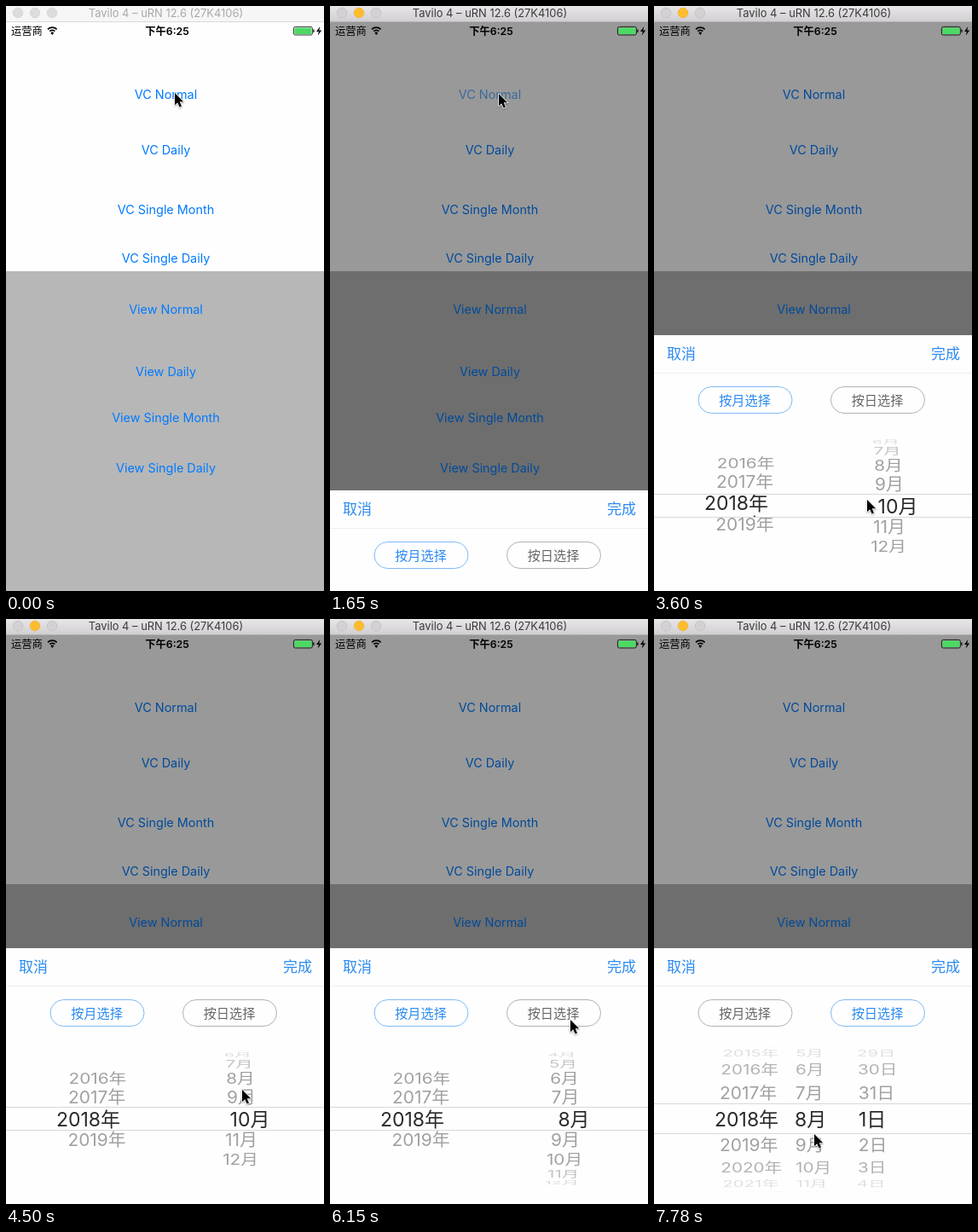
Write an HTML page with a canvas that moves like this. It is 373 px wide and 686 px high and loops after 8 s.

```html
<!DOCTYPE html>
<html lang="zh">
<head>
<meta charset="utf-8">
<title>Date picker</title>
<style>
  html, body { margin: 0; width: 373px; height: 686px; overflow: hidden; background: #fff; }
  canvas { display: block; width: 373px; height: 686px; }
</style>
</head>
<body>
<canvas id="stage"></canvas>
<script>
const W = 373, H = 686, LOOP = 8000, TICK = 150;
const MID = W / 2, SHEET = 386, AXIS = 586;
const OPEN_AT = 1500, DAILY_AT = 6450;
const BLUE = '#2a8af0';
const FONT = 'Inter, "Noto Sans CJK SC", "Noto Sans CJK", sans-serif';
const canvas = document.getElementById('stage');
const ctx = canvas.getContext('2d');
const dpr = window.devicePixelRatio || 1;
canvas.width = W * dpr;
canvas.height = H * dpr;

const links = {
  'VC Normal': 104, 'VC Daily': 169, 'VC Single Month': 239, 'VC Single Daily': 296,
  'View Normal': 356, 'View Daily': 429, 'View Single Month': 483, 'View Single Daily': 542
};

// Pointer glides; each starts where the one before ended
const glides = [
  { from: 1950, to: 2400, x: 161, y: 510 },
  { from: 2400, to: 3300, x: 118, y: 592 },
  { from: 3450, to: 3600, x: 250, y: 579 },
  { from: 3600, to: 4500, x: 277, y: 552 },
  { from: 4500, to: 5250, x: 276, y: 596 },
  { from: 5700, to: 6150, x: 282, y: 470 },
  { from: 6890, to: 7780, x: 188, y: 604 }
];

const ramp = (t, from, to) => Math.max(0, Math.min(1, (t - from) / (to - from)));
const ease = (t, from, to) => {
  const p = ramp(t, from, to);
  return p * p * (3 - 2 * p);
};

function hold(t) {
  if (t >= 7780) return 7780;
  const base = t >= 6890 ? 6890 : 0;
  return base + Math.floor((t - base) / TICK) * TICK;
}

function pointerAt(t) {
  let x = 198, y = t < 1200 ? 102 : 103;
  for (const g of glides) {
    const p = ease(t, g.from, g.to);
    x += (g.x - x) * p;
    y += (g.y - y) * p;
  }
  return [x, y];
}

// Each drag leaves a remainder that settles after release
const yearAt = t => 2019 - 0.87 * ramp(t, 2550, 3300) - 0.13 * ease(t, 3600, 3900);
const monthAt = t => 10 - 1.5 * ramp(t, 4500, 5250) - 0.5 * ease(t, 5700, 6150);

function text(str, x, y, size, color, align = 'center', weight = 400) {
  ctx.font = `${weight} ${size}px ${FONT}`;
  ctx.fillStyle = color;
  ctx.textAlign = align;
  ctx.fillText(str, x, y + size * 0.37);
}

function rect(x, y, w, h, color) {
  ctx.fillStyle = color;
  ctx.fillRect(x, y, w, h);
}

function round(x, y, w, h, r) {
  ctx.beginPath();
  ctx.roundRect(x, y, w, h, r);
}

function poly(points) {
  ctx.beginPath();
  points.forEach(([x, y]) => ctx.lineTo(x, y));
  ctx.closePath();
}

function clipped(top, bottom, draw) {
  ctx.save();
  ctx.beginPath();
  ctx.rect(0, top, W, bottom - top);
  ctx.clip();
  draw();
  ctx.restore();
}

function titleBar(active) {
  const g = ctx.createLinearGradient(0, 0, 0, 18);
  g.addColorStop(0, active ? '#e8e6e8' : '#f6f6f6');
  g.addColorStop(1, active ? '#d1cfd1' : '#f6f6f6');
  rect(0, 0, W, 18, g);
  rect(0, 18, W, 1, active ? '#b4b2b4' : '#dadada');
  ctx.lineWidth = 0.7;
  for (let i = 0; i < 3; i++) {
    const lit = active && i === 1;
    ctx.beginPath();
    ctx.arc(14 + i * 20, 8, 5.8, 0, Math.PI * 2);
    ctx.fillStyle = lit ? '#ffbd2e' : active ? '#d3d1d3' : '#dcdcdc';
    ctx.strokeStyle = lit ? '#f0ae2c' : active ? '#bebcbe' : '#d0d0d0';
    ctx.fill();
    ctx.stroke();
  }
  text('Tavilo 4 – uRN 12.6 (27K4106)', 187.5, 8.3, 12.9, active ? '#3c3b3c' : '#a8a8a8');
}

function statusBar() {
  text('运营商', 6, 29, 12.3, '#000', 'left');
  text('下午6:25', 189, 29, 12.3, '#000', 'center', 600);
  ctx.strokeStyle = '#000';
  ctx.lineWidth = 1.7;
  for (const r of [4.3, 7.5]) {
    ctx.beginPath();
    ctx.arc(54.3, 32.6, r, -Math.PI * 0.75, -Math.PI * 0.25);
    ctx.stroke();
  }
  ctx.beginPath();
  ctx.moveTo(54.3, 34);
  ctx.arc(54.3, 33, 2.4, -Math.PI * 0.8, -Math.PI * 0.2);
  ctx.fillStyle = '#000';
  ctx.fill();

  ctx.lineWidth = 0.8;
  round(337.4, 24.4, 22, 9.6, 2);
  ctx.stroke();
  ctx.fillStyle = '#4cd964';
  round(338.4, 25.4, 20, 7.6, 1);
  ctx.fill();
  rect(360.3, 27.5, 1.2, 3.4, '#000');
  poly([[368.3, 24], [364, 30], [366.8, 30], [365.8, 34.5], [370.2, 28.4], [367.3, 28.4]]);
  ctx.fillStyle = '#000';
  ctx.fill();
}

function pill(x, label, on) {
  const w = 110;
  round(x + 0.5, SHEET + 60.5, w, 31, 15.5);
  ctx.lineWidth = 1;
  ctx.strokeStyle = on ? '#7fb9f5' : '#b2b2b2';
  ctx.stroke();
  text(label, x + w / 2, SHEET + 76, 15.2, on ? BLUE : '#666');
}

// Rows sit one row height apart along the rim of a drum
function drum(radius, row) {
  const half = Math.round(row * 0.56);
  return { radius, row, top: AXIS - half, bottom: AXIS + half };
}

// Outside the band rows wrap round the drum, inside they are flat and larger
function wheel(col, pos, { radius, row, top, bottom }) {
  const eachRow = (reach, draw) => {
    for (let k = Math.ceil(pos - reach); k <= pos + reach; k++) {
      const label = col.label(k);
      if (label) draw(label, (k - pos) * row);
    }
  };
  const rim = () => eachRow(1.5 * radius / row, (label, arc) => {
    const c = Math.cos(arc / radius), dy = radius * Math.sin(arc / radius);
    const depth = 1 - 0.068 * (1 - c);
    ctx.save();
    ctx.globalAlpha = Math.max(0.08, Math.min(1, 1.25 - (Math.abs(dy) - 40) / 40));
    ctx.translate(MID + (col.x - MID) * depth, AXIS + dy);
    ctx.scale(depth, c);
    text(label, 0, 0, 21, '#a0a0a0', col.align);
    ctx.restore();
  });
  clipped(AXIS - 86, top, rim);
  clipped(bottom, AXIS + 86, rim);
  clipped(top, bottom, () => eachRow(1.5, (label, dy) =>
    text(label, col.big, AXIS + dy, 23, '#2a2a2a', col.align)));
}

const within = (lo, hi, unit) => k => k >= lo && k <= hi ? k + unit : '';
const wrap = (n, unit) => k => ((k - 1) % n + n) % n + 1 + unit;
const monthly = {
  drum: drum(78, 25.5),
  cols: [
    { x: 106.3, big: 96.5, align: 'center', label: within(2016, 2019, '年') },
    { x: 276.3, big: 286, align: 'center', label: within(1, 12, '月') }
  ]
};
const daily = {
  drum: drum(87, 31.4),
  cols: [
    { x: 76.5, big: 71, align: 'left', label: k => k + '年' },
    { x: 165.7, big: 165, align: 'left', label: wrap(12, '月') },
    { x: 240, big: 240, align: 'left', label: wrap(31, '日') }
  ]
};

function sheet(t) {
  const height = H - SHEET, shown = ease(t, OPEN_AT, OPEN_AT + 350);
  if (!shown) return;
  const byDay = t >= DAILY_AT;
  ctx.save();
  ctx.translate(0, Math.round(height * (1 - shown)));
  rect(0, SHEET, W, height, '#fefefe');
  rect(0, SHEET + 44, W, 1, '#eeeeee');
  text('取消', 15, SHEET + 22, 17, BLUE, 'left');
  text('完成', 359, SHEET + 22, 17, BLUE, 'right');
  pill(51.5, '按月选择', !byDay);
  pill(207, '按日选择', byDay);
  const mode = byDay ? daily : monthly;
  const date = byDay ? [2018, 8, 1] : [yearAt(t), monthAt(t)];
  mode.cols.forEach((col, i) => wheel(col, date[i], mode.drum));
  rect(0, mode.drum.top, W, 1, '#d8d8d8');
  rect(0, mode.drum.bottom - 1, W, 1, '#d8d8d8');
  ctx.restore();
}

function pointer(x, y) {
  ctx.save();
  ctx.translate(Math.round(x), Math.round(y));
  poly([[0, 0], [0, 14.2], [3.2, 11.2], [5.6, 16.6], [8, 15.6], [5.7, 10.3], [10.2, 10.3]]);
  ctx.lineJoin = 'round';
  ctx.shadowColor = 'rgba(0,0,0,0.35)';
  ctx.shadowBlur = 2 * dpr;
  ctx.shadowOffsetY = dpr;
  ctx.strokeStyle = '#fff';
  ctx.lineWidth = 1.6;
  ctx.stroke();
  ctx.shadowColor = 'transparent';
  ctx.fillStyle = '#000';
  ctx.fill();
  ctx.restore();
}

function draw(t) {
  const open = t >= OPEN_AT;
  ctx.setTransform(dpr, 0, 0, dpr, 0, 0);
  rect(0, 0, W, H, '#fefefe');
  rect(0, 311, W, H - 311, '#b7b7b7');
  for (const label in links) {
    const pressed = open && label === 'VC Normal';
    ctx.globalAlpha = pressed ? 0.2 + 0.8 * ramp(t, OPEN_AT, OPEN_AT + 300) : 1;
    text(label, 187.5, links[label], 14.4, '#007aff');
  }
  ctx.globalAlpha = 1;
  rect(0, 0, W, H, `rgba(0,0,0,${0.4 * ramp(t, OPEN_AT, OPEN_AT + TICK)})`);
  sheet(t);
  statusBar();
  titleBar(open);
  pointer(...pointerAt(t));
}

function frame() {
  draw(hold(performance.now() % LOOP));
  requestAnimationFrame(frame);
}
frame();
</script>
</body>
</html>
```
